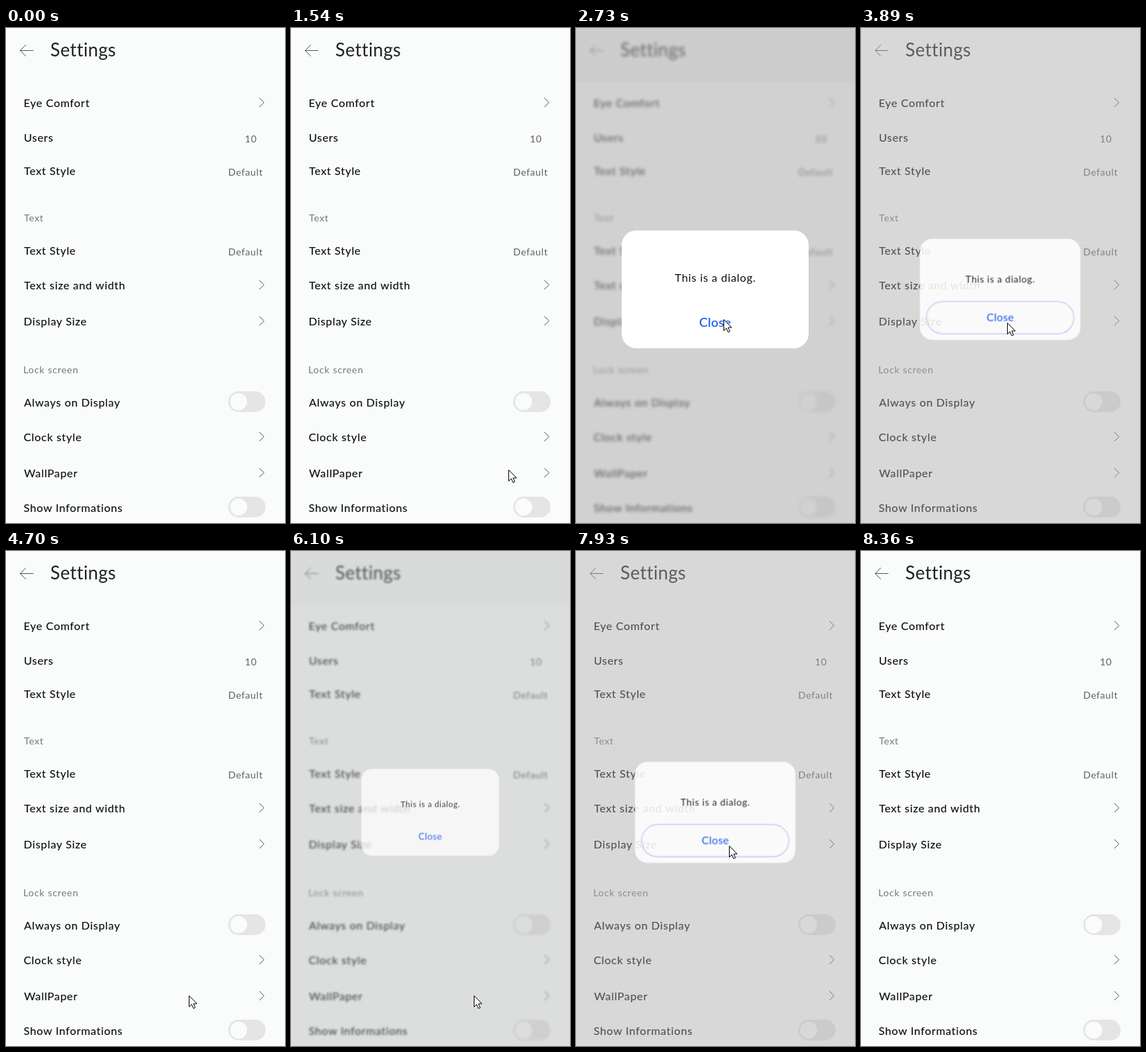
Recreate the animation shown at these times as an HTML page. Size 403 px wide and 714 px high, loop 9.04 s.

```html
<!DOCTYPE html>
<html lang="en">
<head>
<meta charset="utf-8">
<title>Settings dialog</title>
<style>
  html, body { margin: 0; width: 100%; height: 100%; overflow: hidden; background: #fafcfc; }
  body { position: relative; }
  body > * { position: absolute; left: 0; top: 0; }
  .layer { width: 403px; height: 714px; overflow: hidden; }
  .loop { animation: 9040ms ease infinite; }

  text {
    font: 16px Lato, "Open Sans", sans-serif;
    letter-spacing: .68px;
    fill: #0c0c0c;
    stroke: #0c0c0c;
    stroke-width: .12px;
    stroke-linejoin: round;
  }
  .title { font-size: 26px; letter-spacing: .4px; fill: #202224; stroke: none; }
  .value { font-size: 14px; letter-spacing: .6px; fill: #606164; stroke: none; }
  .section { font-size: 14px; fill: #74787c; stroke: none; }
  .message, .button { text-anchor: middle; }
  .message { stroke: none; }
  .button { font-size: 18px; letter-spacing: .5px; fill: #1659ee; stroke: #1659ee; stroke-width: .2px; }
  .line { fill: none; stroke: #55575a; stroke-width: 1; }

  #page { animation-name: blur; }
  #shade { background: rgba(171, 169, 171, .51); animation-name: fade; }
  #header { width: 403px; height: 79px; background: rgba(10, 10, 40, .02); animation-name: tint; }
  #dialog { transform-origin: 201px 377px; animation-name: fade, pop; }
  #ring { fill: none; stroke: #c8ccfb; stroke-width: 1.8; animation-name: ring; animation-timing-function: step-end; }
  #cursor { width: 14px; height: 21px; overflow: visible; animation-name: move; animation-timing-function: ease-in-out; }

  @keyframes fade {
    0%, 17.035% { opacity: 0; }
    20.575%, 42.478% { opacity: 1; }
    46.903%, 65.929% { opacity: 0; }
    69.469%, 87.168% { opacity: 1; }
    91.593%, 100% { opacity: 0; }
  }
  @keyframes pop {
    0%, 17.035% { transform: scale(0); }
    20.575%, 42.478% { transform: scale(1); }
    46.903%, 65.929% { transform: scale(0); }
    69.469%, 87.168% { transform: scale(1); }
    91.593%, 100% { transform: scale(0); }
  }
  /* The blur grows while opening and drops at once on closing. */
  @keyframes blur {
    0%, 17.035% { filter: blur(0); }
    20.575%, 42.477% { filter: blur(2px); }
    42.478%, 65.929% { filter: blur(0); }
    69.469%, 87.167% { filter: blur(2px); }
    87.168%, 100% { filter: blur(0); }
  }
  @keyframes tint {
    0%, 17.035% { opacity: 0; }
    20.575%, 42.477% { opacity: 1; }
    42.478%, 65.929% { opacity: 0; }
    69.469%, 87.167% { opacity: 1; }
    87.168%, 100% { opacity: 0; }
  }
  @keyframes ring {
    0% { opacity: 0; }
    41.814% { opacity: 1; }
    46.903% { opacity: 0; }
    86.726% { opacity: 1; }
    91.593%, 100% { opacity: 0; }
  }
  @keyframes move {
    0%, 7.08% { transform: translate(350px, 716px); }
    10.066%, 23.894% { transform: translate(314px, 637px); }
    26.327% { transform: translate(206px, 425px); }
    27.102%, 28.65% { transform: translate(221px, 417px); }
    30.199%, 32.633% { transform: translate(213px, 420px); }
    33.02% { transform: translate(202px, 424px); }
    33.407%, 44.248% { transform: translate(211px, 425px); }
    51.327% { transform: translate(263px, 641px); }
    51.991%, 72.013% { transform: translate(264px, 641px); }
    74.668%, 76.217% { transform: translate(208px, 418px); }
    78.54% { transform: translate(234px, 438px); }
    80.752% { transform: translate(206px, 432px); }
    83.075%, 88.496% { transform: translate(221px, 425px); }
    92.478%, 100% { transform: translate(290px, 716px); }
  }
</style>
</head>
<body>
<svg id="page" class="layer loop" viewBox="0 0 403 714">
  <defs>
    <path id="chevron" class="line" d="M366 -6.5l6.8 6.5-6.8 6.5"/>
    <g id="toggle">
      <rect x="321" y="-15" width="54" height="30" rx="15" fill="#e5e5e5"/>
      <circle cx="336" r="12.3" fill="#fafcfc"/>
    </g>
  </defs>

  <path class="line" d="M39.5 32.5H20.5M28.7 24.3l-8.2 8.2 8.2 8.2"/>
  <text class="title" x="64" y="41">Settings</text>

  <text x="25.5" y="114">Eye Comfort</text>
  <use href="#chevron" y="107.5"/>
  <text x="25.8" y="164">Users</text>
  <text class="value" x="345" y="165">10</text>
  <text x="26" y="212">Text Style</text>
  <text class="value" x="321" y="213">Default</text>

  <text class="section" x="26" y="279">Text</text>
  <text x="26" y="327">Text Style</text>
  <text class="value" x="321" y="328">Default</text>
  <text x="26" y="377">Text size and width</text>
  <use href="#chevron" y="370.5"/>
  <text x="25.5" y="429">Display Size</text>
  <use href="#chevron" y="422.5"/>

  <text class="section" x="25" y="498">Lock screen</text>
  <text x="26" y="546">Always on Display</text>
  <use href="#toggle" y="539"/>
  <text x="25.5" y="596">Clock style</text>
  <use href="#chevron" y="589.5"/>
  <text x="26" y="648">WallPaper</text>
  <use href="#chevron" y="641.5"/>
  <text x="25.5" y="698">Show Informations</text>
  <use href="#toggle" y="691"/>
</svg>

<div id="shade" class="layer loop"></div>
<div id="header" class="loop"></div>

<svg id="dialog" class="layer loop" viewBox="0 0 403 714">
  <rect x="66" y="292" width="270" height="170" rx="21" fill="#fff"/>
  <text class="message" x="201.3" y="366">This is a dialog.</text>
  <rect id="ring" class="loop" x="77" y="397.5" width="248" height="54" rx="27"/>
  <text class="button" x="201.2" y="431">Close</text>
</svg>

<svg id="cursor" class="loop" viewBox="0 0 14 21">
  <path d="M.5 .5V16.5L4.2 13 6.8 18.8 9.3 17.7 6.8 12H11.8Z" fill="#fff" stroke="#000"/>
</svg>
</body>
</html>
```
